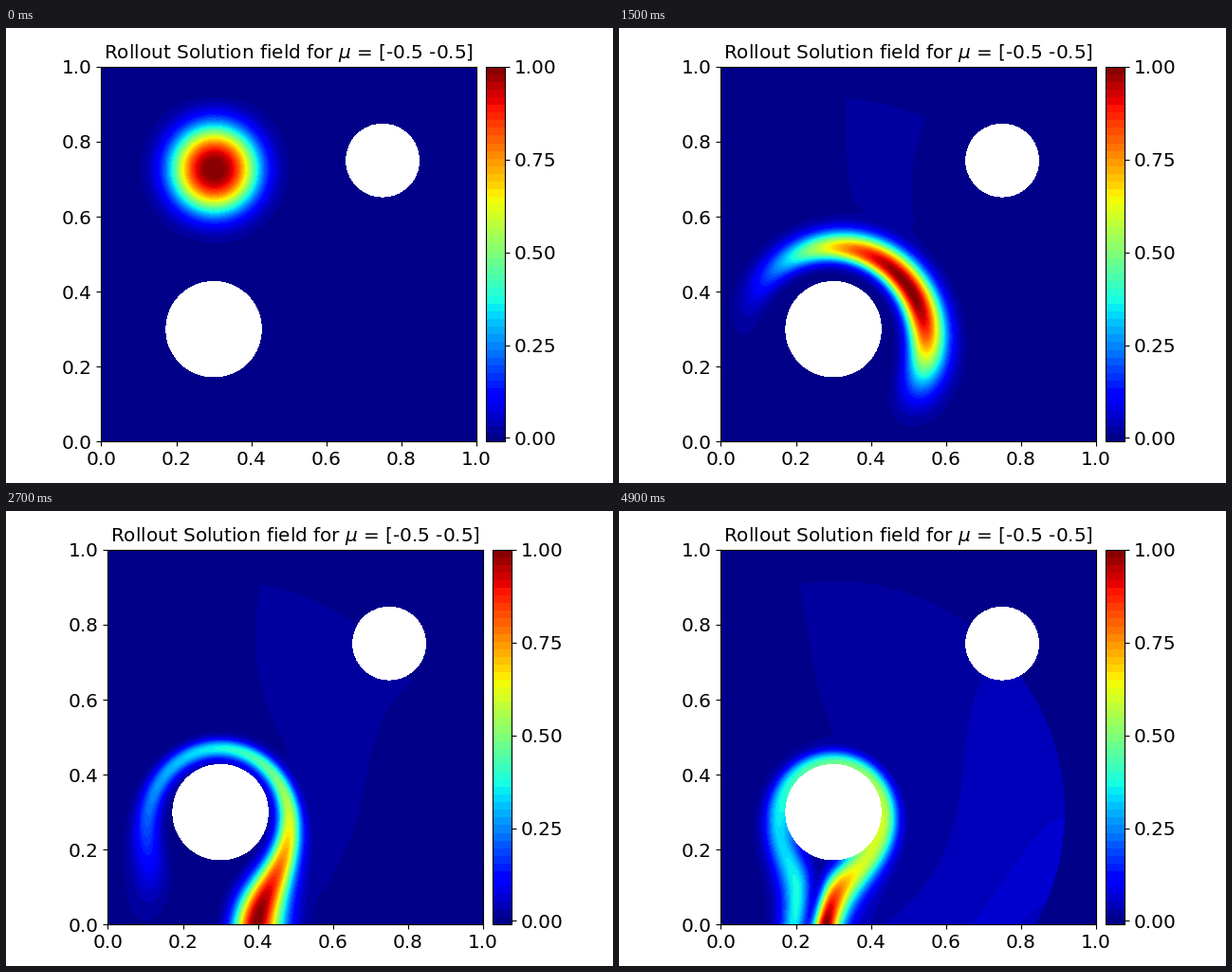
Recreate the animation shown at these times as a matplotlib script. Size 640 px wide and 480 px high, loop 5000 ms.

```python
import numpy as np
import matplotlib.pyplot as plt
from matplotlib.animation import FuncAnimation
from matplotlib.patches import Circle

WIDTH, HEIGHT, DPI = 640, 480, 100
FRAMES, INTERVAL = 50, 100
LEVELS = np.linspace(-0.01, 1, 50)

# Flow past the lower obstacle: a downward stream with a no-slip layer
# and a slight clockwise swirl, carrying a diffusing blob.
OBSTACLE, RADIUS = 0.3, 0.127
SPEED, LAYER, SWIRL = 0.27, 0.13, 0.2
DIFFUSION = 0.0002
SUBSTEPS = 40
DT = INTERVAL / 1000 / SUBSTEPS

# Log-polar grid around the obstacle; angles run clockwise from the top.
N_RHO, N_PHI, REACH = 96, 256, 0.62
D_RHO = np.log(REACH / RADIUS) / N_RHO
D_PHI = 2 * np.pi / N_PHI
RHO = (np.arange(N_RHO)[:, None] + 0.5) * D_RHO
PHI = np.arange(N_PHI) * D_PHI
R = RADIUS * np.exp(RHO)


def to_xy(r, phi):
    return OBSTACLE + r * np.sin(phi), OBSTACLE + r * np.cos(phi)


decay = np.exp(-(R - RADIUS) / LAYER)
inflow = SPEED * (1 - decay) ** 2
shear = 2 * SPEED * (1 - decay) * decay / LAYER
ADVECT_RHO = -inflow * np.cos(PHI) / R / (2 * D_RHO)
ADVECT_PHI = (inflow + R * shear) * (np.sin(PHI) + SWIRL) / R / (2 * D_PHI)
DIFFUSE_RHO = DIFFUSION / (R * D_RHO) ** 2
DIFFUSE_PHI = DIFFUSION / (R * D_PHI) ** 2


def rate(c):
    """Time derivative of the concentration, with no flux at the wall."""
    inner = np.concatenate([c[:1], c[:-1]])
    outer = np.concatenate([c[1:], c[-1:]])
    before = np.roll(c, 1, axis=1)
    after = np.roll(c, -1, axis=1)
    return (DIFFUSE_RHO * (outer + inner - 2 * c)
            + DIFFUSE_PHI * (after + before - 2 * c)
            - ADVECT_RHO * (outer - inner)
            - ADVECT_PHI * (after - before))


def simulate():
    x, y = to_xy(R, PHI)
    visible = y >= 0
    c = np.exp(-(np.hypot(x - 0.302, y - 0.727) / 0.112) ** 2.7)
    fields = []
    for _ in range(FRAMES):
        fields.append(np.clip(c / c[visible].max(), 0, 0.9995))
        for _ in range(SUBSTEPS):
            c = c + DT * rate(c + DT / 2 * rate(c))
    return fields


def place(axes, left, width):
    axes.set_position([left / WIDTH, 43.6 / HEIGHT,
                       width / WIDTH, 395.6 / HEIGHT])


def draw_field(field):
    # Close the seam and carry the innermost ring under the obstacle.
    z = np.column_stack([field, field[:, 0]])
    z = np.vstack([z[:1], z])
    return ax.contourf(MESH_X, MESH_Y, z, levels=LEVELS, cmap="jet")


plt.rcParams.update({"font.family": "DejaVu Sans", "font.size": 14.4,
                     "axes.titlesize": 14.4, "xtick.labelsize": 14.4,
                     "ytick.labelsize": 14.4})
fig = plt.figure(figsize=(WIDTH / DPI, HEIGHT / DPI), dpi=DPI)
ax = fig.add_axes([0, 0, 1, 1], facecolor=plt.cm.jet(0.01))
bar_ax = fig.add_axes([0, 0, 0.1, 1])

MESH_X, MESH_Y = to_xy(np.vstack([[[RADIUS * 0.97]], R]),
                       np.append(PHI, 2 * np.pi))
fields = simulate()
contours = draw_field(fields[0])
fig.colorbar(contours, cax=bar_ax, ticks=np.linspace(0, 1, 5), format="%.2f")
for center, radius in ((OBSTACLE, RADIUS), (0.75, 0.097)):
    ax.add_patch(Circle((center, center), radius, color="white", lw=0,
                        antialiased=False, zorder=1.5))
ax.set(xlim=(0, 1), ylim=(0, 1))
ax.set_xticks(np.linspace(0, 1, 6))
ax.set_yticks(np.linspace(0, 1, 6))
ax.set_title(r"Rollout Solution field for $\mu$ = [-0.5 -0.5]")


def update(frame):
    global contours
    # The layout settles seven pixels to the right after the first frame.
    left = 100.4 if frame == 0 else 107.4
    place(ax, left, 395.6)
    place(bar_ax, left + 405.6, 19.8)
    contours.remove()
    contours = draw_field(fields[frame])
    return [contours]


anim = FuncAnimation(fig, update, frames=FRAMES, interval=INTERVAL,
                     init_func=lambda: [], repeat=True, repeat_delay=0)
plt.show()
```
